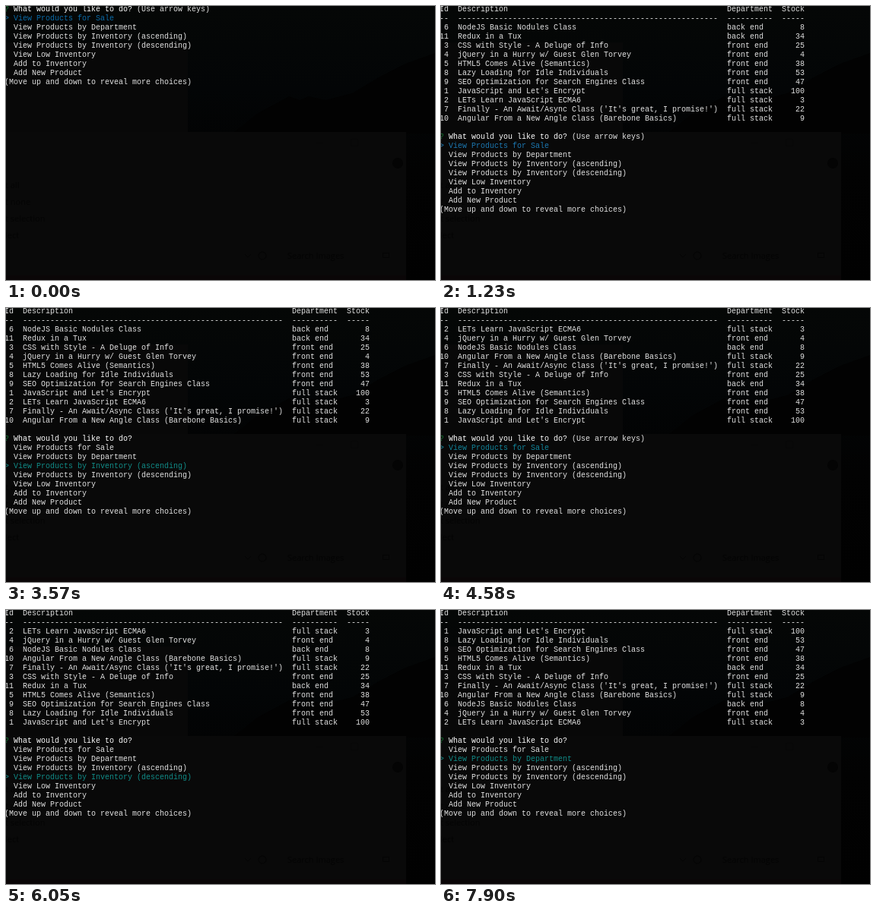
Write an HTML page with a canvas that moves like this. It is 564x361 px and loops after 8000 ms.

```html
<!DOCTYPE html>
<html lang="en">
<head>
<meta charset="utf-8">
<title>Store terminal</title>
<style>
html, body { margin: 0; width: 564px; height: 361px; overflow: hidden; background: #050606; }
canvas { display: block; }
</style>
</head>
<body>
<canvas id="stage" width="564" height="361"></canvas>
<script>
const ctx = document.getElementById('stage').getContext('2d');
const LOOP = 8000, CELL = 6, LINE = 12, LEFT = -2;
const MONO = '10px "Liberation Mono", "DejaVu Sans Mono", monospace';
const SANS = '11px "Open Sans", "Noto Sans", sans-serif';
const TEXT = '#e2e2e2', BRIGHT = '#ffffff', GREEN = '#12702f';
const BLUE = '#0b6ba8', TEAL = '#118c88', MIXED = '#11849a';

// id, title, department, stock
const products = [
  [6, 'NodeJS Basic Nodules Class', 'back end', 8],
  [11, 'Redux in a Tux', 'back end', 34],
  [3, 'CSS with Style - A Deluge of Info', 'front end', 25],
  [4, 'jQuery in a Hurry w/ Guest Glen Torvey', 'front end', 4],
  [5, 'HTML5 Comes Alive (Semantics)', 'front end', 38],
  [8, 'Lazy Loading for Idle Individuals', 'front end', 53],
  [9, 'SEO Optimization for Search Engines Class', 'front end', 47],
  [1, "JavaScript and Let's Encrypt", 'full stack', 100],
  [2, 'LETs Learn JavaScript ECMA6', 'full stack', 3],
  [7, "Finally - An Await/Async Class ('It's great, I promise!')", 'full stack', 22],
  [10, 'Angular From a New Angle Class (Barebone Basics)', 'full stack', 9]
];
const tables = {
  department: products,
  ascending: [...products].sort((a, b) => a[3] - b[3]),
  descending: [...products].sort((a, b) => b[3] - a[3])
};
const choices = [
  'View Products for Sale',
  'View Products by Department',
  'View Products by Inventory (ascending)',
  'View Products by Inventory (descending)',
  'View Low Inventory',
  'Add to Inventory',
  'Add New Product'
];

// start time, table shown, selected choice (-1: cleared screen), highlight
const steps = [
  [0, null, 0, BLUE],
  [300, null, 1, BLUE],
  [1160, null, -1],
  [1230, 'department', 0, '#1c78b2'],
  [2790, 'department', 1, TEAL],
  [3570, 'department', 2, TEAL],
  [4580, 'ascending', 0, MIXED],
  [5590, 'ascending', 1, TEAL],
  [5820, 'ascending', 2, TEAL],
  [6050, 'ascending', 3, TEAL],
  [7060, 'descending', 0, MIXED],
  [7900, 'descending', 1, TEAL]
];

function rect(x, y, w, h, color) {
  ctx.fillStyle = color;
  ctx.fillRect(x, y, w, h);
}

function print(row, col, text, color = TEXT) {
  ctx.font = MONO;
  ctx.fillStyle = color;
  ctx.fillText(text, LEFT + col * CELL, row * LINE + 7);
}

function drawBackdrop() {
  const sky = ctx.createLinearGradient(0, 0, 0, 361);
  sky.addColorStop(0, '#050706');
  sky.addColorStop(0.3, '#030506');
  sky.addColorStop(0.6, '#020202');
  sky.addColorStop(1, '#010101');
  rect(0, 0, 564, 361, sky);

  ctx.fillStyle = '#020202';
  ctx.beginPath();
  ctx.moveTo(298, 168);
  for (const [x, y] of [[330, 142], [352, 130], [372, 119], [386, 124], [398, 119],
    [420, 124], [455, 115], [490, 94], [525, 76], [564, 62], [564, 168]]) ctx.lineTo(x, y);
  ctx.fill();

  rect(0, 48, 239, 120, '#080808');
  rect(0, 166, 526, 195, '#090909');
  rect(0, 355, 526, 6, '#0a0607');

  const ink = '#040404';
  ctx.font = SANS;
  ctx.fillStyle = ink;
  ['t all', 't none', 't selection', 'lect'].forEach((s, i) => ctx.fillText(s, -1, 240 + i * 22));
  ctx.fillText('Search Images', 370, 333);
  ctx.beginPath();
  ctx.arc(515, 207, 7, 0, 7);
  ctx.fill();

  ctx.strokeStyle = ink;
  ctx.strokeRect(495.5, 325.5, 8, 6);
  ctx.beginPath();
  ctx.moveTo(314, 327);
  ctx.lineTo(318, 331);
  ctx.lineTo(322, 327);
  ctx.moveTo(342, 329);
  ctx.arc(337, 329, 5, 0, 7);
  ctx.stroke();

  ctx.strokeStyle = '#070707';
  ctx.strokeRect(453.5, 175.5, 9, 9);
  ctx.beginPath();
  ctx.moveTo(407, 180.5);
  ctx.lineTo(417, 180.5);
  ctx.stroke();
}

function drawTable(rows) {
  print(0, 0, 'Id  Description');
  print(0, 63, 'Department  Stock');
  print(1, 0, [2, 57, 10, 5].map(n => '-'.repeat(n)).join('  '));
  rows.forEach(([id, title, dept, stock], i) => {
    print(i + 2, 0, String(id).padStart(2));
    print(i + 2, 4, title);
    print(i + 2, 63, dept);
    print(i + 2, 75, String(stock).padStart(5));
  });
}

function drawMenu(top, selected, highlight) {
  print(top, 0, '?', GREEN);
  print(top, 2, 'What would you like to do?', BRIGHT);
  if (selected === 0) print(top, 29, '(Use arrow keys)');
  choices.forEach((choice, i) => {
    const active = i === selected;
    print(top + 1 + i, 0, (active ? '> ' : '  ') + choice, active ? highlight : TEXT);
  });
  print(top + 8, 0, '(Move up and down to reveal more choices)');
}

function draw(now) {
  const t = now % LOOP;
  const [, table, selected, highlight] = steps.findLast(s => s[0] <= t);
  drawBackdrop();
  if (selected < 0) {
    rect(0, 7, 4, 3, '#ffffff');
  } else {
    if (table) drawTable(tables[table]);
    drawMenu(table ? 14 : 0, selected, highlight);
  }
}

const start = performance.now();
function frame() {
  draw(performance.now() - start);
  requestAnimationFrame(frame);
}
frame();
</script>
</body>
</html>
```
